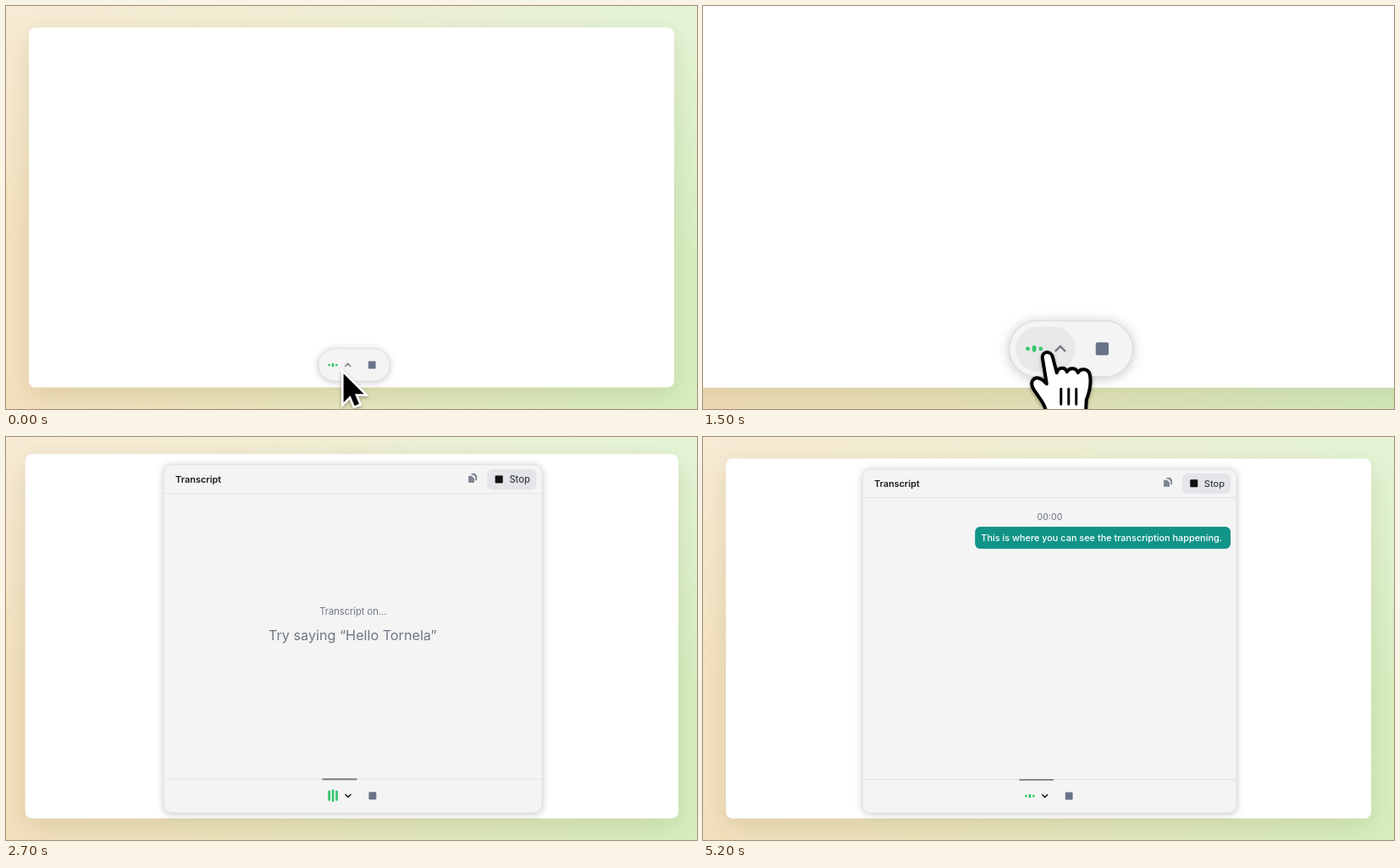
These frames come from a looping animation (816 px wide and 476 px high, 5250 ms). An HTML page:

```html
<!DOCTYPE html>
<html lang="en">
<head>
<meta charset="utf-8">
<title>Live transcript</title>
<style>
  html, body { margin: 0; width: 100%; height: 100%; overflow: hidden; }
  body {
    background:
      linear-gradient(180deg, rgba(255,255,255,.36), rgba(255,255,255,0) 62%),
      linear-gradient(90deg, #f3e0bd 0%, #ece3bc 32%, #e2e8be 62%, #d5eec0 100%);
  }
  svg { display: block; width: 816px; height: 476px; }
  text { font-family: Inter, Roboto, "Liberation Sans", sans-serif; }
  .card { fill: #fff; filter: drop-shadow(0 8px 14px rgba(95,90,30,.15)); }
  .panel { fill: #f4f4f4; stroke: #dcdcdc; stroke-width: .7; filter: drop-shadow(0 1px 4px rgba(0,0,0,.22)); }
  .rule { stroke: #e2e3e4; stroke-width: 1; }
  .chev { fill: none; stroke-width: 1.4; stroke-linecap: round; stroke-linejoin: round; }
  .arrow { fill: #000; stroke: #fff; stroke-width: 2.6; paint-order: stroke; stroke-linejoin: miter; }
  .hand { stroke: #000; stroke-width: 4; stroke-linejoin: round; stroke-linecap: round; }
  #cursor { filter: drop-shadow(0 2px 2px rgba(0,0,0,.3)); }
</style>
</head>
<body>
<svg viewBox="0 0 816 476">
  <defs>
    <g id="handShape" class="hand">
      <path fill="#fff" d="M-6 6C-6-2 4-2 6 5L11 24C13 17 21 17 23 23C26 17 34 18 36 24C39 18 48 19 50 26C52 36 50 46 46 56L45 73H-1C-2 62-8 56-12 50C-16 44-20 40-18 34C-15 28-8 29-1 37Z"/>
      <path fill="none" stroke-width="3" d="M16 43V61M25 43V61M34 43V61"/>
    </g>
  </defs>

  <g id="scene">
    <rect class="card" x="27" y="25.5" width="762" height="425" rx="8"/>
    <rect class="panel" id="panel"/>
    <rect id="hover" x="373.5" y="409" width="40.5" height="30.5" rx="15.2" fill="#e8e8e8"/>

    <g id="content">
      <path class="rule" d="M188.5 71.5H630M188.5 404.5H630"/>
      <path d="M373.5 404.8H414" stroke="#7b7b7b" stroke-width="1.8"/>
      <text x="202.3" y="58.8" font-size="10.8" font-weight="600" fill="#1b1b1b">Transcript</text>
      <g fill="#7f8694">
        <path d="M547.5 48h4l2.5 2.6v5.6h-1.8v-4l-2.6-2.6h-2.1z"/>
        <path d="M544 50.8h4l3 3v5h-7z"/>
      </g>
      <rect x="566" y="43" width="57.3" height="24" rx="6" fill="#e4e5e8"/>
      <rect x="575.2" y="50.3" width="9" height="9" rx="1" fill="#111"/>
      <text x="591.8" y="58.8" font-size="11" font-weight="500" fill="#3b3f47">Stop</text>

      <g id="hint" text-anchor="middle" fill="#6f7684">
        <text x="409.5" y="213" font-size="11">Transcript on...</text>
        <text x="409" y="242.2" font-size="16">Try saying “Hello Tornela”</text>
      </g>

      <g id="speech">
        <text x="409.5" y="97.8" font-size="10.6" text-anchor="middle" fill="#6b7280">00:00</text>
        <g id="bubble">
          <rect id="bubbleBox" y="106" height="26" rx="6" fill="#119488"/>
          <text id="words" x="613" y="122.8" font-size="10.9" font-weight="500" text-anchor="end" fill="#fff"></text>
        </g>
      </g>
    </g>

    <g id="bars" fill="#34c86d"></g>
    <path id="chevUp" class="chev" stroke="#777a80" d="M400.6 425.4l3.1-3.1 3.1 3.1"/>
    <path id="chevDown" class="chev" stroke="#111" d="M400.6 422.5l3.1 3.1 3.1-3.1"/>
    <rect x="427.8" y="419.6" width="8.8" height="8.8" rx="1.2" fill="#697388"/>
  </g>

  <g id="cursor">
    <path id="arrow" class="arrow" d="M1.3 3.1v17l4-4 2.5 6 2.7-1.1-2.5-5.9h5.3z"/>
    <use class="ghost" href="#handShape"/>
    <use class="ghost" href="#handShape"/>
    <use class="ghost" href="#handShape"/>
  </g>
</svg>
<script>
const LOOP = 5250, STEP = 50;
const FOCUS = { x: 379, y: 450 }, MAX_ZOOM = 1.74, RATE = 5.56;
const ZOOM_IN = 125, HOVER = 1000, CLICK = 1612, LEAVE = 1750, SPEAK = 3300;
const PILL = [369, 405, 84, 38, 19], PANEL = [188.5, 38, 441.5, 406, 9];
const CAPTIONS = [
  [SPEAK, 'Is where you can', .45],
  [4000, 'This is where you can see the transcription happening.', .45],
  [4600, 'This is where you can see the transcription happening.', 1]
];

const $ = id => document.getElementById(id);
const clamp = v => Math.min(1, Math.max(0, v));
const mix = (a, b, p) => a + (b - a) * p;
const ramp = (t, a, b) => clamp((t - a) / (b - a));
const show = (id, on) => { $(id).style.display = on ? '' : 'none'; };
const attrs = (el, map) => { for (const k in map) el.setAttribute(k, map[k]); };

const bars = [381.6, 386, 390.4].map(x => {
  const bar = document.createElementNS('http://www.w3.org/2000/svg', 'rect');
  attrs(bar, { x: x - 1.35, width: 2.7, rx: 1.2 });
  return $('bars').appendChild(bar);
});
const ghosts = [...document.querySelectorAll('.ghost')];

// critically damped spring, 0 to 1
function spring(t, start) {
  const w = RATE * Math.max(0, t - start) / 1000;
  return 1 - (1 + w) * Math.exp(-w);
}

const zoomAt = t => 1 + (MAX_ZOOM - 1) * (spring(t, ZOOM_IN) - spring(t, CLICK));

function project(x, y, zoom) {
  return [FOCUS.x + (x - FOCUS.x) * zoom, FOCUS.y + (y - FOCUS.y) * zoom];
}

function handAt(t) {
  const p = Math.pow(Math.max(0, t - LEAVE) / 450, 1.6);
  return project(395 + 310.6 * p, 426.5 - 184 * p, zoomAt(t));
}

function drawCursor(t, zoom) {
  const size = Math.pow(zoom, .57);
  const pointing = t >= HOVER;
  show('cursor', t < 2600);
  show('arrow', !pointing);
  const p = spring(t, ZOOM_IN);
  const [x, y] = project(mix(396, 394.6, p), mix(428, 427, p), zoom);
  attrs($('arrow'), { transform: `translate(${x} ${y}) scale(${2 * size})` });

  // averaged copies give motion blur
  ghosts.forEach((g, i) => {
    const [hx, hy] = handAt(t + (i - 1) * 5);
    g.style.display = pointing && (t > LEAVE || i === 0) ? '' : 'none';
    attrs(g, {
      transform: `translate(${hx} ${hy}) scale(${size / 1.37})`,
      opacity: 1 / (i + 1)
    });
  });
}

function drawBars(t) {
  const wobble = 1 - .45 * Math.sin(Math.PI * (t - 2700) / 450) ** 2;
  const level = ramp(t, 2350, 2500) * (1 - ramp(t, 4700, 5000)) * wobble;
  bars.forEach((bar, i) => {
    const h = i === 1 ? mix(4.4, 14.5, level) : mix(2.7, 12, level);
    attrs(bar, { y: 424 - h / 2, height: h });
  });
}

function drawPanel(t) {
  const open = 1 - (1 - ramp(t, CLICK, 1900)) ** 3;
  const [x, y, width, height, rx] = PILL.map((v, i) => mix(v, PANEL[i], open));
  attrs($('panel'), { x, y, width, height, rx });
  attrs($('content'), { opacity: ramp(t, 1720, 1900) });
  show('hover', t >= HOVER && t < CLICK);
  show('chevUp', t < 1650);
  show('chevDown', t >= 1650);
  show('hint', t < SPEAK);
  show('speech', t >= SPEAK);
}

function drawCaption(t) {
  const line = CAPTIONS.filter(c => t >= c[0]).pop();
  if (!line) return;
  const words = $('words');
  if (words.textContent !== line[1]) words.textContent = line[1];
  const width = words.getComputedTextLength() + 17;
  attrs($('bubbleBox'), { x: 623 - width, width });
  attrs($('bubble'), { opacity: line[2] });
}

function draw(t) {
  const zoom = zoomAt(t);
  const [x, y] = project(0, 0, zoom);
  attrs($('scene'), { transform: `translate(${x} ${y}) scale(${zoom})` });
  drawPanel(t);
  drawCaption(t);
  drawBars(t);
  drawCursor(t, zoom);
}

const start = performance.now();
function tick() {
  const t = (performance.now() - start) % LOOP;
  draw(Math.floor(t / STEP) * STEP);
  requestAnimationFrame(tick);
}
tick();
</script>
</body>
</html>
```
